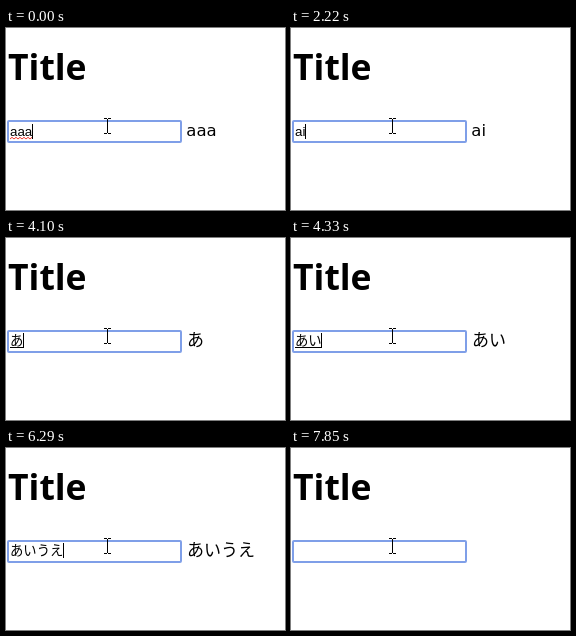
These frames come from a looping animation (279x182 px, 8.02 s). An HTML page with a canvas:

```html
<!DOCTYPE html>
<html lang="ja">
<head>
<meta charset="utf-8">
<title>Title</title>
<style>
html, body { margin: 0; width: 100%; height: 100%; overflow: hidden; background: #fff; }
canvas { display: block; }
</style>
</head>
<body>
<canvas id="stage" width="279" height="182"></canvas>
<script>
const ctx = document.getElementById('stage').getContext('2d');
const LOOP = 8020;
const KANA = '"Noto Sans CJK JP", "Noto Sans CJK", sans-serif';
const FIELD = '300 13.333px "Liberation Sans", ' + KANA;
const LATIN = '"DejaVu Sans", sans-serif';
const HEADING = 'bold 35.5px "Noto Sans", "Open Sans", sans-serif';

// [start ms, text, caret shown, mode]
const steps = [
  [0, 'aaa', 1, 'spell'], [360, 'aaa', 0, 'spell'], [890, 'aaa', 1, 'spell'],
  [1060, 'aa', 1], [1290, 'a', 1], [1440, '', 1], [1990, '', 0],
  [2070, 'a', 1], [2220, 'ai', 1], [2370, 'aiu', 1], [2450, 'aiue', 1], [2540, 'aiueo', 1],
  [3070, 'aiue', 0], [3240, 'aiu', 0], [3390, 'ai', 0], [3560, 'a', 0], [3630, 'a', 1], [3710, '', 1],
  [4100, 'あ', 1, 'compose'], [4260, 'あい', 1, 'compose'], [4340, 'あいう', 1, 'compose'],
  [4410, 'あいうえ', 1, 'compose'], [4490, 'あいうえお', 1, 'suggest'], [5040, 'あいうえお', 0, 'suggest'],
  [5190, 'あいうえお', 1], [5740, 'あいうえお', 0],
  [6290, 'あいうえ', 1], [6440, 'あいう', 1], [6590, 'あい', 1], [6760, 'あ', 1], [6830, 'あ', 0],
  [7150, '', 0], [7300, '', 1], [7850, '', 0]
];

function rect(x, y, w, h, color) {
  ctx.fillStyle = color;
  ctx.fillRect(x, y, w, h);
}

function write(text, x, y, font) {
  ctx.font = font;
  ctx.fillStyle = '#000';
  ctx.fillText(text, x, y);
}

function line(points, color, width) {
  ctx.beginPath();
  points.forEach(([x, y]) => ctx.lineTo(x, y));
  ctx.strokeStyle = color;
  ctx.lineWidth = width;
  ctx.stroke();
}

function drawFrame() {
  ctx.beginPath();
  ctx.roundRect(2, 93, 173, 21, 1);
  ctx.strokeStyle = '#7f9fe8';
  ctx.lineWidth = 2;
  ctx.stroke();
}

function drawSquiggle(width) {
  const points = [];
  for (let x = 0; x <= width; x += 2) points.push([4 + x, x % 4 ? 109.3 : 111]);
  line(points, '#f03a30', 1);
}

function drawPointer() {
  for (const y of [90, 105]) {
    rect(98, y, 3, 1, '#000');
    rect(102, y, 3, 1, '#000');
  }
  rect(101, 91, 1, 14, '#000');
}

function drawSuggestions() {
  rect(0, 111, 279, 71, '#fff');
  rect(0, 111, 279, 1, '#a0a0a0');
  ctx.letterSpacing = '-3.3px';
  ['あいうえお', 'あいうえおかきくけこ', 'あいうえおかきくけこさしすせそ'].forEach((text, i) =>
    write(text, 4, 133 + Math.round(i * 28.5), '300 15.5px ' + KANA));
  ctx.letterSpacing = '0px';
  line([[263.5, 122], [272.5, 131]], '#444', 1.3);
  line([[272.5, 122], [263.5, 131]], '#444', 1.3);
}

function draw(time) {
  const [, text, caret, mode] = steps.findLast(s => s[0] <= time);
  const kana = text > 'z';
  rect(0, 0, 279, 182, '#fff');
  write('Title', 2, 52, HEADING);
  drawFrame();
  write(text, 4, kana ? 107 : 108, FIELD);
  const width = ctx.measureText(text).width;
  if (mode === 'spell') drawSquiggle(width);
  if (mode === 'compose' || mode === 'suggest') rect(4, 109, Math.floor(width), 1, '#000');
  if (caret) rect(Math.floor(4 + width), kana ? 95 : 96, 1, 15, '#000');
  write(text, kana ? 181 : 180.3, 108, kana ? '300 17px ' + KANA : '16.5px ' + LATIN);
  drawPointer();
  if (mode === 'suggest') drawSuggestions();
}

const start = performance.now();
function tick() {
  draw((performance.now() - start) % LOOP);
  requestAnimationFrame(tick);
}
tick();
</script>
</body>
</html>
```
